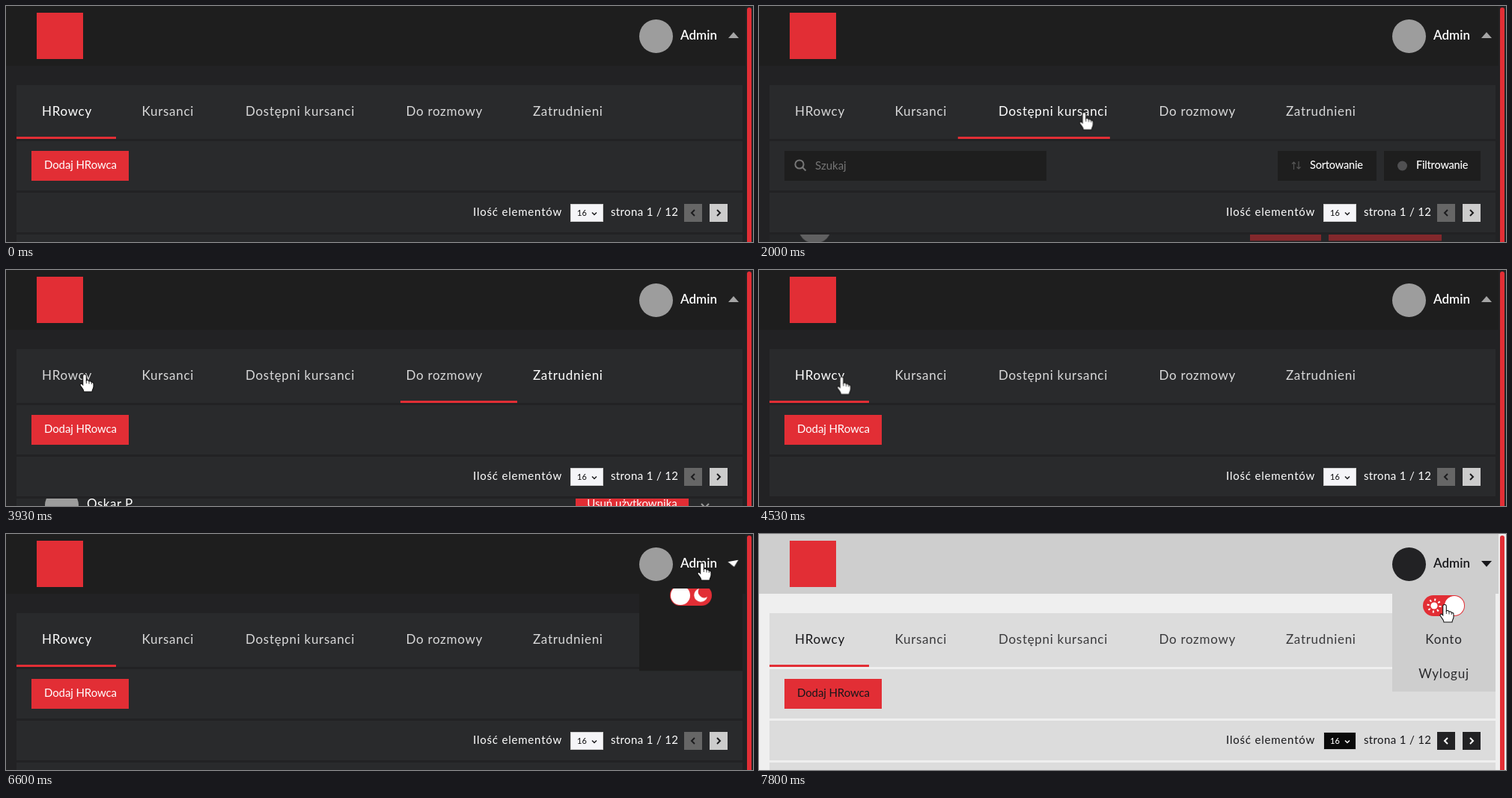
An HTML page for the animation above (8000 ms loop, 998 px wide and 316 px high).

```html
<!DOCTYPE html>
<html lang="pl">
<head>
<meta charset="utf-8">
<title>Panel</title>
<style>
@property --p { syntax: "<percentage>"; inherits: true; initial-value: 0%; }
html, body { margin: 0; width: 100%; height: 100%; overflow: hidden; background: #222224; }
svg { display: block; }
#stage {
  /* --p runs from the dark theme (0%) to the light one (100%) */
  --head: color-mix(in srgb, #cecece var(--p), #1e1e1e);
  --body: color-mix(in srgb, #efefef var(--p), #222224);
  --panel: color-mix(in srgb, #dcdcdc var(--p), #292a2c);
  --ink: color-mix(in srgb, #17171a var(--p), #ffffff);
  --face: color-mix(in srgb, #222224 var(--p), #9d9d9d);
  --select: color-mix(in srgb, #0a0a0a var(--p), #f5f5f8);
  --mark: color-mix(in srgb, #ffffff var(--p), #1c1c1e);
  --prev: color-mix(in srgb, #222224 var(--p), #666666);
  --next: color-mix(in srgb, #222224 var(--p), #cccccc);
  --red: #e22e35;
  animation: theme 8s linear infinite;
  font-family: Lato, "Open Sans", sans-serif;
}
#stage * { animation-duration: 8s; animation-iteration-count: infinite; animation-timing-function: linear; }
text { fill: var(--ink); white-space: pre; }
.head { fill: var(--head); }
.body { fill: var(--body); }
.panel { fill: var(--panel); }
.red { fill: var(--red); }
.face { fill: var(--face); }
.line { fill: none; stroke-width: 2; }
.tabs text { font-size: 17px; letter-spacing: .7px; opacity: .82; }
.small { font-size: 15px; }
.tool { font-size: 14.5px; letter-spacing: -.2px; font-weight: 500; }
.row text { font-size: 17px; letter-spacing: .5px; }
.row .small { font-size: 15px; letter-spacing: 0; text-anchor: middle; }

@keyframes theme { 0%, 93.4% { --p: 0%; } 97.3%, 100% { --p: 100%; } }

.tabs text:nth-child(1) { animation-name: tab1; }
.tabs text:nth-child(2) { animation-name: tab2; }
.tabs text:nth-child(3) { animation-name: tab3; }
.tabs text:nth-child(4) { animation-name: tab4; }
.tabs text:nth-child(5) { animation-name: tab5; }
@keyframes tab1 { 0%, 15.2% { opacity: 1; } 17%, 49.3% { opacity: .82; } 52%, 100% { opacity: 1; } }
@keyframes tab2 { 0%, 15.2% { opacity: .82; } 17%, 22.5% { opacity: 1; } 25%, 100% { opacity: .82; } }
@keyframes tab3 { 0%, 22.5% { opacity: .82; } 25%, 31.5% { opacity: 1; } 33.5%, 100% { opacity: .82; } }
@keyframes tab4 { 0%, 31.5% { opacity: .82; } 33.5%, 38.7% { opacity: 1; } 41%, 100% { opacity: .82; } }
@keyframes tab5 { 0%, 38.7% { opacity: .82; } 41%, 49.3% { opacity: 1; } 52%, 100% { opacity: .82; } }

#bar { animation-name: bar; }
@keyframes bar {
  0%, 15.1% { x: 14px; width: 133px; animation-timing-function: ease; }
  19.5%, 22.5% { x: 147px; width: 139px; animation-timing-function: ease; }
  27%, 31.2% { x: 286px; width: 214px; animation-timing-function: ease-out; }
  34.8%, 38.7% { x: 501px; width: 169px; animation-timing-function: ease; }
  43%, 48.2% { x: 670px; width: 161px; }
  49.15% { x: 525px; width: 156px; }
  50.5% { x: 250px; width: 143px; animation-timing-function: ease-out; }
  53.5%, 100% { x: 14px; width: 133px; }
}

#add { animation-name: add; }
#find { animation-name: find; }
#stage #add, #stage #find, #stage #cv { animation-timing-function: step-end; }
@keyframes add { 0% { opacity: 1; } 14.6% { opacity: 0; } 48.9%, 100% { opacity: 1; } }
@keyframes find { 0% { opacity: 0; } 14.6% { opacity: 1; } 48.9%, 100% { opacity: 0; } }

#list { animation-name: list; }
@keyframes list {
  0%, 14.5% { opacity: 1; transform: none; }
  14.51%, 15.5% { opacity: 0; transform: translateY(-90px); animation-timing-function: ease-out; }
  21.2%, 23% { opacity: 1; transform: none; }
  23.01% { opacity: 0; transform: translateY(-90px); animation-timing-function: ease-out; }
  28.8%, 31.5% { opacity: 1; transform: none; }
  31.51% { opacity: 0; transform: translateY(-90px); }
  34.12% { opacity: .7; transform: translateY(-22px); }
  37%, 39% { opacity: 1; transform: none; }
  39.01%, 41% { opacity: 0; transform: translateY(-90px); animation-timing-function: ease-out; }
  46.6% { opacity: .95; transform: translateY(-26px); }
  49.2% { opacity: 1; transform: translateY(-25px); }
  55%, 62.5% { opacity: 0; transform: translateY(-90px); }
  64.12% { opacity: .22; transform: translateY(-90px); animation-timing-function: ease-out; }
  69.1%, 100% { opacity: 1; transform: none; }
}
#cv { animation-name: cv; }
@keyframes cv { 0% { opacity: 1; } 39%, 100% { opacity: 0; } }

#arrow { transform-origin: 972px 39.5px; animation-name: arrow; }
@keyframes arrow {
  0%, 79.5% { transform: none; opacity: .6; animation-timing-function: ease-out; }
  82.5% { transform: rotate(170deg); opacity: 1; }
  84%, 100% { transform: rotate(180deg); opacity: 1; }
}
#menu { animation-name: menu; }
#switch { animation-name: toggle; }
#links { animation-name: links; }
@keyframes menu {
  0%, 79.8% { transform: translateY(-200px); }
  82.5% { transform: translateY(-28px); animation-timing-function: ease-out; }
  84.5%, 100% { transform: none; }
}
@keyframes toggle {
  0%, 79.8% { transform: translateY(-100px); }
  82.5% { transform: translateY(-14px); animation-timing-function: ease-out; }
  84.5%, 100% { transform: none; }
}
@keyframes links { 0%, 82.5% { opacity: 0; } 85.5%, 100% { opacity: .9; } }
#knob { animation-name: knob; }
#sun { animation-name: sun; }
#moon { animation-name: moon; }
@keyframes knob { 0%, 93.4% { transform: none; } 97%, 100% { transform: translateX(28px); } }
@keyframes sun { 0%, 93.4% { opacity: 0; } 97%, 100% { opacity: 1; } }
@keyframes moon { 0%, 93.4% { opacity: 1; } 97%, 100% { opacity: 0; } }

#hand { animation-name: hand; }
@keyframes hand {
  0%, .6% { transform: translate(1012px, 326px); animation-timing-function: ease-out; }
  6.6%, 8.6% { transform: translate(454px, 117px); animation-timing-function: ease-in-out; }
  14%, 15.8% { transform: translate(234px, 144px); animation-timing-function: ease-in-out; }
  21.8%, 23.2% { transform: translate(400px, 142px); animation-timing-function: ease-in-out; }
  29.5%, 32.2% { transform: translate(600px, 146px); }
  34.12% { transform: translate(666px, 151px); animation-timing-function: ease-out; }
  37.5%, 39.8% { transform: translate(752px, 146px); animation-timing-function: ease-in-out; }
  46.6%, 49.2% { transform: translate(105px, 140px); }
  64.12% { transform: translate(116px, 147px); animation-timing-function: ease-in-out; }
  69.1%, 70% { transform: translate(204px, 138px); animation-timing-function: ease-in-out; }
  79.1% { transform: translate(932px, 35px); }
  82.5%, 84.5% { transform: translate(930px, 39px); animation-timing-function: ease-in-out; }
  90.8% { transform: translate(915px, 93px); }
  91.7%, 100% { transform: translate(916px, 95px); }
}
</style>
</head>
<body>
<svg id="stage" width="998" height="316" viewBox="0 0 998 316">
  <defs>
    <clipPath id="below"><rect y="306" width="998" height="10"/></clipPath>
    <clipPath id="drop"><rect x="846" y="73" width="138" height="243"/></clipPath>
  </defs>
  <rect class="body" width="998" height="316"/>
  <rect class="head" width="988" height="80"/>
  <rect class="red" x="41" y="9" width="62" height="62"/>

  <g class="panel">
    <rect x="14" y="106" width="970" height="72"/>
    <rect x="14" y="181" width="970" height="66"/>
    <rect x="14" y="250" width="970" height="53"/>
  </g>
  <g class="tabs">
    <text x="48" y="147">HRowcy</text>
    <text x="181.5" y="147">Kursanci</text>
    <text x="320" y="147">Dostępni kursanci</text>
    <text x="534.5" y="147">Do rozmowy</text>
    <text x="704" y="147">Zatrudnieni</text>
  </g>
  <rect id="bar" class="red" x="14" y="175" width="133" height="3"/>

  <g id="add">
    <rect class="red" x="34" y="194" width="130" height="40"/>
    <text class="small" x="51" y="218" letter-spacing="-.1">Dodaj HRowca</text>
  </g>
  <g id="find">
    <g class="head">
      <rect x="34" y="194" width="350" height="40"/>
      <rect x="693" y="194" width="132" height="40"/>
      <rect x="835" y="194" width="129" height="40"/>
    </g>
    <g class="line" stroke="#777">
      <circle cx="54" cy="212" r="5.6"/>
      <path d="M58 216l4.5 4.5"/>
    </g>
    <text class="small" x="75" y="219" style="fill:#757575">Szukaj</text>
    <path class="line" d="M714.5 219v-10m-2.5 2.5l2.5-2.5 2.5 2.5M721 208v10m-2.5-2.5l2.5 2.5 2.5-2.5" stroke="#555" style="stroke-width:1.2"/>
    <text class="tool" x="736" y="218">Sortowanie</text>
    <circle cx="859.5" cy="214" r="6.5" fill="#505052"/>
    <text class="tool" x="878" y="218">Filtrowanie</text>
  </g>

  <text class="small" x="624" y="281" letter-spacing=".8">Ilość elementów</text>
  <rect x="754.5" y="265.5" width="43" height="23" stroke="#d0d0d0" style="fill:var(--select)"/>
  <text x="763" y="281" font-size="11" font-weight="500" style="fill:var(--mark)">16</text>
  <path class="line" d="M783 276.500l3 3 3-3" style="stroke:var(--mark);stroke-width:1.5"/>
  <text class="small" x="808" y="281" letter-spacing=".35">strona 1 / 12</text>
  <rect x="906" y="265" width="24" height="24" style="fill:var(--prev)"/>
  <rect x="940" y="265" width="24" height="24" style="fill:var(--next)"/>
  <path class="line" d="M920 273l-4 4 4 4M950 273l4 4-4 4" style="stroke:var(--mark)"/>

  <g clip-path="url(#below)">
    <g id="list" class="row">
      <rect class="panel" x="14" y="306" width="970" height="66"/>
      <rect class="panel" x="14" y="375" width="970" height="60"/>
      <circle class="face" cx="74.5" cy="340" r="22.5"/>
      <text x="108" y="344">Oskar P.</text>
      <g id="cv">
        <rect class="red" x="656" y="319" width="95" height="40"/>
        <text class="small" x="703.5" y="343">Pokaż CV</text>
      </g>
      <rect class="red" x="761" y="319" width="151" height="40"/>
      <text class="small" x="836.5" y="343">Usuń użytkownika</text>
      <path class="line" d="M929 338l5 5 5-5" stroke="#999"/>
      <path class="line" d="M34 375v60M115.500 375v60M234.500 375v60M314.500 375v60M396.500 375v60M471.500 375v60M610.500 375v60M700.500 375v60M830.500 375v60M964 375v60" stroke="#555" style="stroke-width:1"/>
      <g font-weight="700">
        <text class="small" x="355" y="392">pracy</text>
        <text class="small" x="550" y="392">typ pracy</text>
        <text class="small" x="656" y="406">Umowa</text>
        <text class="small" x="880" y="392">projekty</text>
      </g>
    </g>
  </g>

  <g clip-path="url(#drop)">
    <rect id="menu" class="head" x="846" y="70" width="138" height="141"/>
    <g id="switch">
      <rect class="red" x="887" y="82" width="56" height="28" rx="14"/>
      <path id="moon" d="M926 87a9 9 0 1 0 11 11a8 8 0 0 1 -11 -11z" fill="#fff"/>
      <g id="sun">
        <circle cx="902" cy="96" r="4.600" fill="#fff"/>
        <circle class="line" cx="902" cy="96" r="8" stroke="#fff" style="stroke-width:3" stroke-dasharray="2 4.283"/>
      </g>
      <circle id="knob" cx="901" cy="96" r="13" fill="#fff"/>
    </g>
    <g id="links" font-size="17" letter-spacing=".8" text-anchor="middle">
      <text x="915" y="147">Konto</text>
      <text x="915" y="193">Wyloguj</text>
    </g>
  </g>

  <circle class="face" cx="868.5" cy="40.5" r="22.5"/>
  <text x="901" y="45" font-size="17" font-weight="600">Admin</text>
  <path id="arrow" d="M965 43l7-8 7 8z" style="fill:var(--ink)"/>
  <path class="red" d="M990 316V5a3 3 0 0 1 6 0V316z"/>

  <g id="hand">
    <path d="M0 -.5C1.5 -.5 2.3 .5 2.3 2V8C3.5 7 5.5 7.5 6 9C7.5 8.3 9 9 9.3 10.3C11 10 12 11 12 12.5V16C12 19 10 20 10 23H-1C-1 20 -3.5 18 -5.5 15C-7 13 -4.8 11.3 -3.2 12.8L-2.3 13.8V2C-2.3 .5 -1.5 -.5 0 -.5Z" fill="#fff" stroke="#111" stroke-width="1.1"/>
    <path class="line" d="M2.3 8v4M6 9v3.5M9.3 10.3v2.7" stroke="#222" style="stroke-width:.9"/>
  </g>
</svg>
</body>
</html>
```
